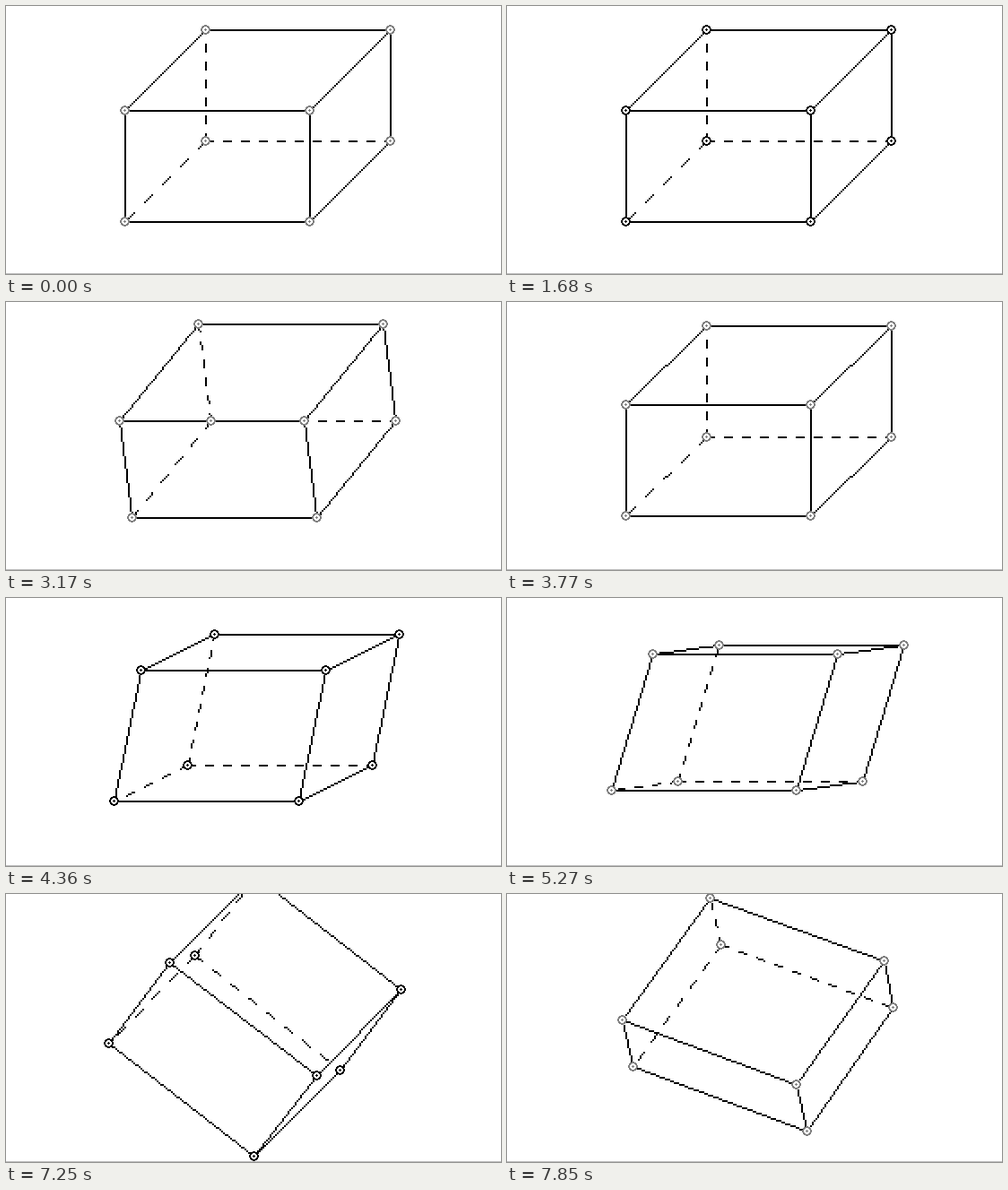
An HTML page with a canvas that plays this animation: 552 by 299 pixels, repeating every 7990 ms.

```html
<!DOCTYPE html>
<html>
<head>
<meta charset="utf-8">
<style>
html, body { margin: 0; width: 100%; height: 100%; overflow: hidden; background: #fff; }
canvas { display: block; }
</style>
</head>
<body>
<canvas id="stage" width="552" height="299"></canvas>
<script>
const ctx = document.getElementById('stage').getContext('2d');
const LOOP = 7990, TICKS = 53;

// Box extents around its pivot, and the oblique projection
const SIDES = [[-97, 109], [-62.3, 62.3], [-64.5, 59.5]];
const PIVOT = [273.94, 130.3], SLANT = 0.71;

// [tick, degrees]: tilt about the width axis, roll about the depth axis
const TILT = [[12, 0], [16, -22], [18, -35], [21, -9.5], [27, 5], [29, 20],
              [32, 36], [34, 32], [44, 32], [48, -5], [52, -32]];
const ROLL = [[43, 0], [44, 11.5], [48, -38], [52, -20]];

function angleAt(keys, tick) {
  const next = keys.findIndex(key => key[0] >= tick);
  if (next === 0) return 0;
  const [t0, a0] = keys[next - 1], [t1, a1] = keys[next];
  return (a0 + (a1 - a0) * (tick - t0) / (t1 - t0)) * Math.PI / 180;
}

function rotate(u, v, angle) {
  const c = Math.cos(angle), s = Math.sin(angle);
  return [u * c - v * s, u * s + v * c];
}

// Corner bits: 1 = right, 2 = back, 4 = top; result in 2 px cells
function corner(bits, tilt, roll) {
  let [x, depth, z] = SIDES.map((side, axis) => side[bits >> axis & 1]);
  [depth, z] = rotate(depth, z, -tilt);
  [x, z] = rotate(x, z, roll);
  const shift = SLANT * depth;
  return [PIVOT[0] + x + shift, PIVOT[1] - z - shift].map(v => Math.round(v / 2));
}

// Line of 2 px cells; dashes are counted along the longer axis
function line([x0, y0], [x1, y1], dashed) {
  const dx = x1 - x0, dy = y1 - y0;
  const n = Math.max(Math.abs(dx), Math.abs(dy));
  for (let i = 0; i <= n; i++) {
    if (dashed && i % 10 >= 5) continue;
    ctx.fillRect(2 * Math.round(x0 + dx * i / n), 2 * Math.round(y0 + dy * i / n), 2, 2);
  }
}

// Ring with a dot inside, without smoothing
function marker([cx, cy], color) {
  for (let y = -5; y <= 5; y++) {
    for (let x = -5; x <= 5; x++) {
      const r = Math.hypot(x, y);
      if (r > 5.1) continue;
      ctx.fillStyle = r > 3.5 || r <= 1 ? color : '#fff';
      ctx.fillRect(2 * cx + x, 2 * cy + y, 1, 1);
    }
  }
}

function draw(time) {
  const tick = Math.min(TICKS - 1, Math.floor(time / LOOP * TICKS + 0.13));
  const tilt = angleAt(TILT, tick), roll = angleAt(ROLL, tick);
  const points = [...Array(8).keys()].map(bits => corner(bits, tilt, roll));

  ctx.fillStyle = '#fff';
  ctx.fillRect(0, 0, 552, 299);
  ctx.fillStyle = '#c0c0c0';
  ctx.fillRect(0, 298, 552, 1);

  // The three edges at the hidden corner (2) are dashed
  ctx.fillStyle = '#000';
  for (let i = 0; i < 8; i++) {
    for (const bit of [1, 2, 4]) {
      const j = i ^ bit;
      if (i === 2) line(points[i], points[j], true);
      else if (i < j && j !== 2) line(points[i], points[j], false);
    }
  }

  const gray = (tick + 1.4) % 5.15 < 2;
  points.forEach(p => marker(p, gray ? '#808080' : '#000'));
}

function frame() {
  draw(performance.now() % LOOP);
  requestAnimationFrame(frame);
}
frame();
</script>
</body>
</html>
```
